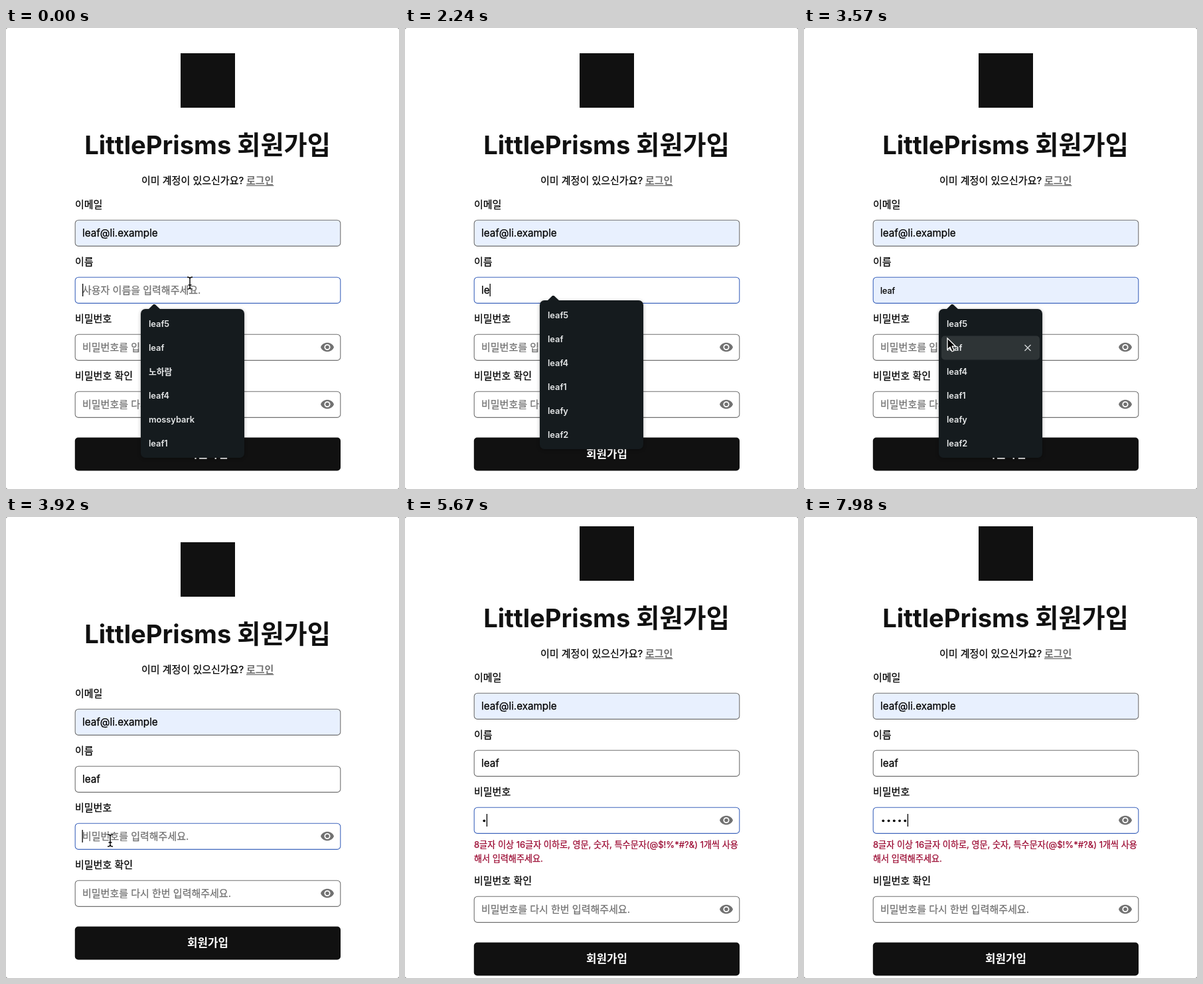
An HTML page with a canvas that plays this animation: 592 px wide and 694 px high, repeating every 8 s.

```html
<!DOCTYPE html>
<html lang="ko">
<head>
<meta charset="utf-8">
<title>회원가입</title>
<style>
html, body { margin: 0; width: 100%; height: 100%; overflow: hidden; background: #fff; }
canvas { display: block; width: 592px; height: 694px; }
</style>
</head>
<body>
<canvas id="stage"></canvas>
<script>
const W = 592, H = 694, LOOP = 8000;
const canvas = document.getElementById('stage');
const ctx = canvas.getContext('2d');
const dpr = Math.max(1, window.devicePixelRatio || 1);
canvas.width = W * dpr;
canvas.height = H * dpr;

const FONT = 'Inter, "Noto Sans CJK KR", "Noto Sans CJK", sans-serif';
const INK = '#111', GRAY = '#717171', BLUE = '#3f66bd', RED = '#9b0a32', FILL = '#e8f0fe';
const LEFT = 104, WIDTH = 400, TEXT_X = 115;

const FIRST_LIST = ['leaf5', 'leaf', '노하람', 'leaf4', 'mossybark', 'leaf1'];
const MATCHES = ['leaf5', 'leaf', 'leaf4', 'leaf1', 'leafy', 'leaf2'];
const NAME_ERROR = ['2글자 이상, 12글자 이하로 입력해주세요.'];
const PASS_ERROR = [
  '8글자 이상 16글자 이하로, 영문, 숫자, 특수문자(@$!%*#?&) 1개씩 사용',
  '해서 입력해주세요.'
];

// Stepped tracks: [start time, value]
const NAME = [[0, ''], [1400, 'l'], [2240, 'le'], [2450, 'lea'], [2590, 'leaf']];
const DOTS = [[0, 0], [5530, 1], [5740, 2], [5880, 3], [5950, 4], [7490, 5]];
const CARET = [[0, 1], [70, 0], [630, 1], [1120, 0], [1400, 1], [1960, 0], [2240, 1],
  [3150, 0], [3640, 1], [4480, 0], [5040, 1], [6440, 0], [7000, 1]];
const MENU_TOP = [[0, 423], [1400, 410], [2310, 423], [3920, null]];
const POINTER = [[0, [277, 384]], [840, null], [3360, [277, 384]], [3430, [261, 409]],
  [3500, [238, 441]], [3570, [216, 467]], [3640, [194, 478]], [3710, [170, 485]],
  [3780, [157, 487]], [5530, null]];

function at(track, t) {
  let value = track[0][1];
  for (const [start, v] of track) if (t >= start) value = v;
  return value;
}

// Regular text gets a hairline outline for a slightly sturdier weight.
function text(str, x, mid, size = 15, color = '#000', weight = 400, align = 'left') {
  const base = mid + size * 0.365;
  ctx.font = `${weight} ${size}px ${FONT}`;
  ctx.fillStyle = ctx.strokeStyle = color;
  ctx.textAlign = align;
  ctx.fillText(str, x, base);
  if (weight === 400) {
    ctx.lineWidth = 0.25;
    ctx.strokeText(str, x, base);
  }
  return ctx.measureText(str).width;
}

function box(x, y, w, h, r, fill, stroke) {
  ctx.beginPath();
  ctx.roundRect(x, y, w, h, r);
  if (fill) { ctx.fillStyle = fill; ctx.fill(); }
  if (stroke) { ctx.strokeStyle = stroke; ctx.lineWidth = 1.1; ctx.stroke(); }
}

function poly(points, fill) {
  ctx.beginPath();
  points.forEach(([x, y]) => ctx.lineTo(x, y));
  ctx.closePath();
  ctx.fillStyle = fill;
  ctx.fill();
}

function input(label, top, focus, fill = '#fff') {
  text(label, LEFT, top - 23);
  box(LEFT + 0.2, top + 0.2, WIDTH - 0.4, 39.2, 5, fill, focus ? BLUE : '#707070');
}

function caret(x, top) {
  ctx.fillStyle = '#000';
  ctx.fillRect(x - 0.5, top + 10, 1.3, 19);
}

function eye(top) {
  const x = 484, y = top + 19.5;
  ctx.beginPath();
  ctx.moveTo(x - 10, y);
  ctx.bezierCurveTo(x - 7, y - 9, x + 7, y - 9, x + 10, y);
  ctx.bezierCurveTo(x + 7, y + 9, x - 7, y + 9, x - 10, y);
  ctx.moveTo(x + 4.6, y);
  ctx.arc(x, y, 4.6, 0, Math.PI * 2);
  ctx.moveTo(x + 2.8, y);
  ctx.arc(x, y, 2.8, 0, Math.PI * 2);
  ctx.fillStyle = GRAY;
  ctx.fill('evenodd');
}

function errors(lines, top) {
  lines.forEach((line, i) => text(line, LEFT, top + 56 + i * 21, 13.1, RED));
}

function menu(top, items, hover) {
  const bg = '#151b1e';
  ctx.save();
  ctx.shadowColor = 'rgba(0,0,0,.35)';
  ctx.shadowBlur = 5 * dpr;
  ctx.shadowOffsetY = dpr;
  box(203, top, 156, 224, 7, bg);
  ctx.restore();
  poly([[214, top + 1], [222, top - 7], [224.5, top - 7], [233, top + 1]], bg);
  items.forEach((item, i) => {
    const mid = top + 22.5 + i * 36;
    if (i === hover) {
      box(207, mid - 18, 148, 36, 5, '#2e3436');
      ctx.beginPath();
      ctx.moveTo(332.5, mid - 4.5); ctx.lineTo(341.5, mid + 4.5);
      ctx.moveTo(341.5, mid - 4.5); ctx.lineTo(332.5, mid + 4.5);
      ctx.strokeStyle = '#d5d8d9';
      ctx.lineWidth = 1.3;
      ctx.stroke();
    }
    text(item, 215, mid, 12.8, '#e6e8e9', 600);
  });
}

function beam(x, y) {
  ctx.beginPath();
  for (const s of [-1, 1]) {
    ctx.moveTo(x - 4, y + s * 9);
    ctx.quadraticCurveTo(x, y + s * 9, x, y + s * 6.5);
    ctx.quadraticCurveTo(x, y + s * 9, x + 4, y + s * 9);
  }
  ctx.moveTo(x, y - 7); ctx.lineTo(x, y + 7);
  ctx.moveTo(x - 2.5, y + 3); ctx.lineTo(x + 2.5, y + 3);
  ctx.strokeStyle = '#fff';
  ctx.lineWidth = 3.2;
  ctx.stroke();
  ctx.strokeStyle = '#000';
  ctx.lineWidth = 1.4;
  ctx.stroke();
}

function arrow(x, y) {
  const shape = [[0, 0], [0, 17], [4, 13.4], [7, 20], [10, 18.7], [7.2, 12.2], [12.5, 12.2]]
    .map(([a, b]) => [x + a, y + b]);
  poly(shape, '#000');
  ctx.strokeStyle = '#fff';
  ctx.lineWidth = 1.3;
  ctx.stroke();
}

function header(dy) {
  box(263, 38 + dy, 82, 82, 0, INK);
  text('LittlePrisms 회원가입', 303.5, 176.4 + dy, 38.2, INK, 700, 'center');
  text('이미 계정이 있으신가요?', 204, 229.6 + dy);
  const w = text('로그인', 362, 229.6 + dy, 15, GRAY, 600);
  ctx.fillRect(362, 236.6 + dy, w, 1.3);
}

function draw(t) {
  const nameError = t >= 1400 && t < 2240;
  const passError = t >= 5530;
  const onPass = t >= 3920;
  const name = at(NAME, t), dots = at(DOTS, t), blink = at(CARET, t);
  const menuTop = at(MENU_TOP, t), pointer = at(POINTER, t);
  const items = t < 1400 ? FIRST_LIST : MATCHES;

  let hover = -1;
  if (menuTop && pointer && pointer[0] > 203 && pointer[1] > menuTop + 4)
    hover = Math.floor((pointer[1] - menuTop - 4) / 36);
  const preview = hover >= 0;

  const dy = nameError ? -13.5 : passError ? -24 : 0;
  const nameTop = 375 + dy;
  const passTop = 461 + dy + (nameError ? 27 : 0);
  const againTop = passTop + 86 + (passError ? 48 : 0);

  ctx.setTransform(dpr, 0, 0, dpr, 0, 0);
  ctx.textBaseline = 'alphabetic';
  ctx.fillStyle = '#777';
  ctx.fillRect(0, 0, W, H);
  box(0, 0, W, H, 3, '#fff');

  header(dy);

  input('이메일', 289 + dy, false, FILL);
  text('leaf@li.example', TEXT_X, 308.7 + dy, 15.2);

  input('이름', nameTop, !onPass, preview ? FILL : '#fff');
  let end = TEXT_X + 0.5;
  if (preview) text(items[hover], TEXT_X, nameTop + 20.3, 12.5);
  else if (name) end += text(name, TEXT_X, nameTop + 19.7, 15.2);
  else text('사용자 이름을 입력해주세요.', TEXT_X, nameTop + 19.5, 15, GRAY);
  if (!onPass && blink && !preview) caret(end, nameTop);
  if (nameError) errors(NAME_ERROR, nameTop);

  input('비밀번호', passTop, onPass);
  if (!dots) text('비밀번호를 입력해주세요.', TEXT_X, passTop + 19.5, 15, GRAY);
  for (let i = 0; i < dots; i++) {
    ctx.beginPath();
    ctx.arc(119.3 + i * 8.25, passTop + 20.3, 1.9, 0, Math.PI * 2);
    ctx.fillStyle = '#000';
    ctx.fill();
  }
  if (onPass && blink) caret(TEXT_X + dots * 8.25, passTop);
  eye(passTop);
  if (passError) errors(PASS_ERROR, passTop);

  input('비밀번호 확인', againTop, false);
  text('비밀번호를 다시 한번 입력해주세요.', TEXT_X, againTop + 19.5, 15, GRAY);
  eye(againTop);

  box(LEFT - 0.2, againTop + 69.6, WIDTH + 0.2, 49.8, 5, INK);
  text('회원가입', 304, againTop + 93.8, 16.8, '#fff', 700, 'center');

  if (menuTop) menu(menuTop, items, hover);
  if (pointer) (preview ? arrow : beam)(...pointer);
}

const start = performance.now();
function tick() {
  draw((performance.now() - start) % LOOP);
  requestAnimationFrame(tick);
}
tick();
</script>
</body>
</html>
```
